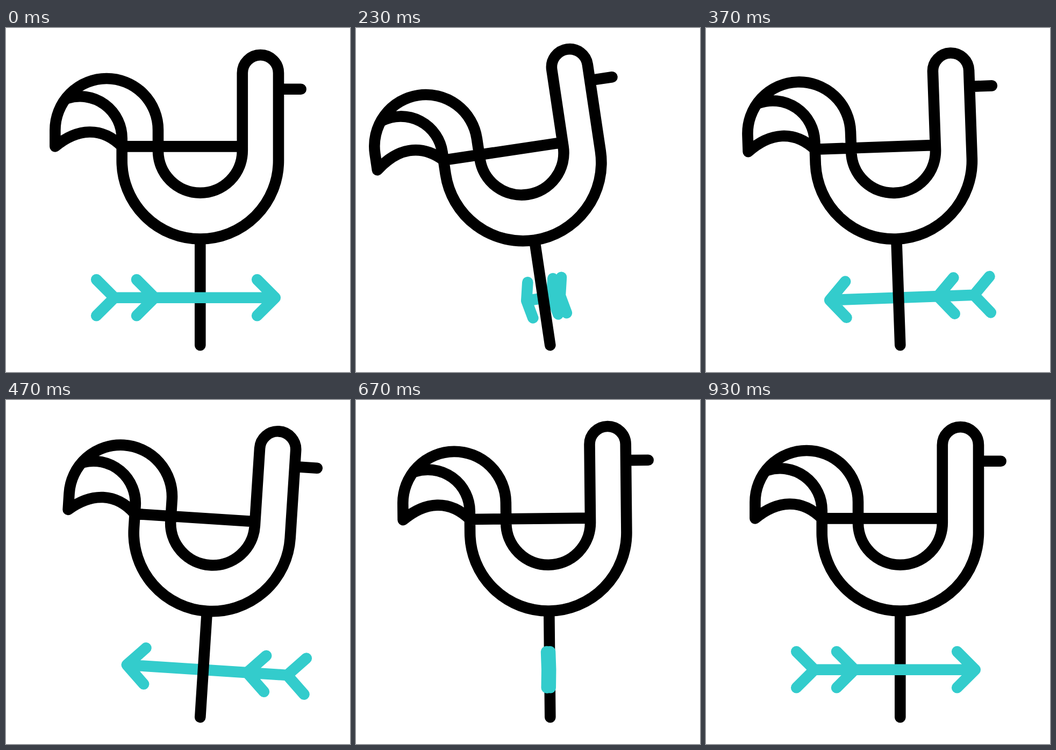
An HTML page for the animation above (1670 ms loop, 640 by 640 pixels).

```html
<!DOCTYPE html>
<html lang="en">
<head>
<meta charset="utf-8">
<title>Weather vane</title>
<style>
html, body { margin: 0; height: 100%; overflow: hidden; background: #fff; }
svg { display: block; width: 100%; height: 100%; }
path { fill: none; stroke: #000; stroke-width: 20.6; stroke-linecap: round; stroke-linejoin: round; }
#arrow { stroke: #3cc; }
</style>
</head>
<body>
<svg viewBox="0 0 640 640">
  <g id="vane">
    <!-- half-circle radii are rounded down, so they grow to fit their chords -->
    <path d="M114 130.9A78.1 78.1 0 0 1 215.7 205.3V246.8A145 145 0 0 0 507 246.8V83.7A33 33 0 0 0 439.8 83.7V228.3A78 78 0 0 1 283 228.3V189.8A95 95 0 0 0 91.4 189.8V220.4C133 186 178 183 215.7 220.4H439.8M507 113.7H548.7"/>
    <path id="pole" d="M361.3 393V590.2"/>
    <path id="arrow"/>
  </g>
</svg>
<script>
const LOOP = 1670, FPS = 30, AXIS = 359.8, MID = 501.7, WING = 33.6;
const [vane, pole, arrow] = ['vane', 'pole', 'arrow'].map(id => document.getElementById(id));

// [frame, degrees] of the damped swing
const swing = [[0, 0], [6.67, -8.53], [15.33, 4.5], [22, -2], [28, 0]];

const smooth = u => u * u * (3 - 2 * u);

function tilt(f) {
  const i = Math.max(1, swing.findIndex(k => k[0] >= f));
  const [f0, a] = swing[i - 1], [f1, b] = swing[i];
  return a + (b - a) * smooth((f - f0) / (f1 - f0));
}

// cubic-bezier(x1, 0, x2, 1)
function ease(u, x1, x2) {
  let lo = 0, hi = 1;
  for (let i = 0; i < 24; i++) {
    const s = (lo + hi) / 2, r = 1 - s;
    if (3 * r * r * s * x1 + 3 * r * s * s * x2 + s ** 3 < u) lo = s; else hi = s;
  }
  return smooth(lo);
}

// Horizontal scale of the arrow as it spins around the pole
const spin = f => f < 14
  ? 1 - 2 * ease(f / 14, .475, .391)
  : 2 * ease((f - 14) / 14, .329, .463) - 1;

function arrowPath(scale) {
  const x = v => (AXIS + (v - AXIS) * scale).toFixed(2);
  const chevron = v => `M${x(v - WING)} ${MID - WING}L${x(v)} ${MID}L${x(v - WING)} ${MID + WING}`;
  return `M${x(201.8)} ${MID}H${x(500.8)}` + [201.8, 276.6, 500.8].map(chevron).join('');
}

function draw(now) {
  const f = Math.min(28, Math.floor((now % LOOP + 4) * FPS / 1000));
  const scale = spin(f);
  vane.setAttribute('transform', `rotate(${tilt(f)} 361.3 590.2)`);
  arrow.setAttribute('d', arrowPath(scale));
  vane.append(scale < 0 ? pole : arrow); // nearer part on top
}

const start = performance.now();
function tick() {
  draw(performance.now() - start);
  requestAnimationFrame(tick);
}
tick();
</script>
</body>
</html>
```
